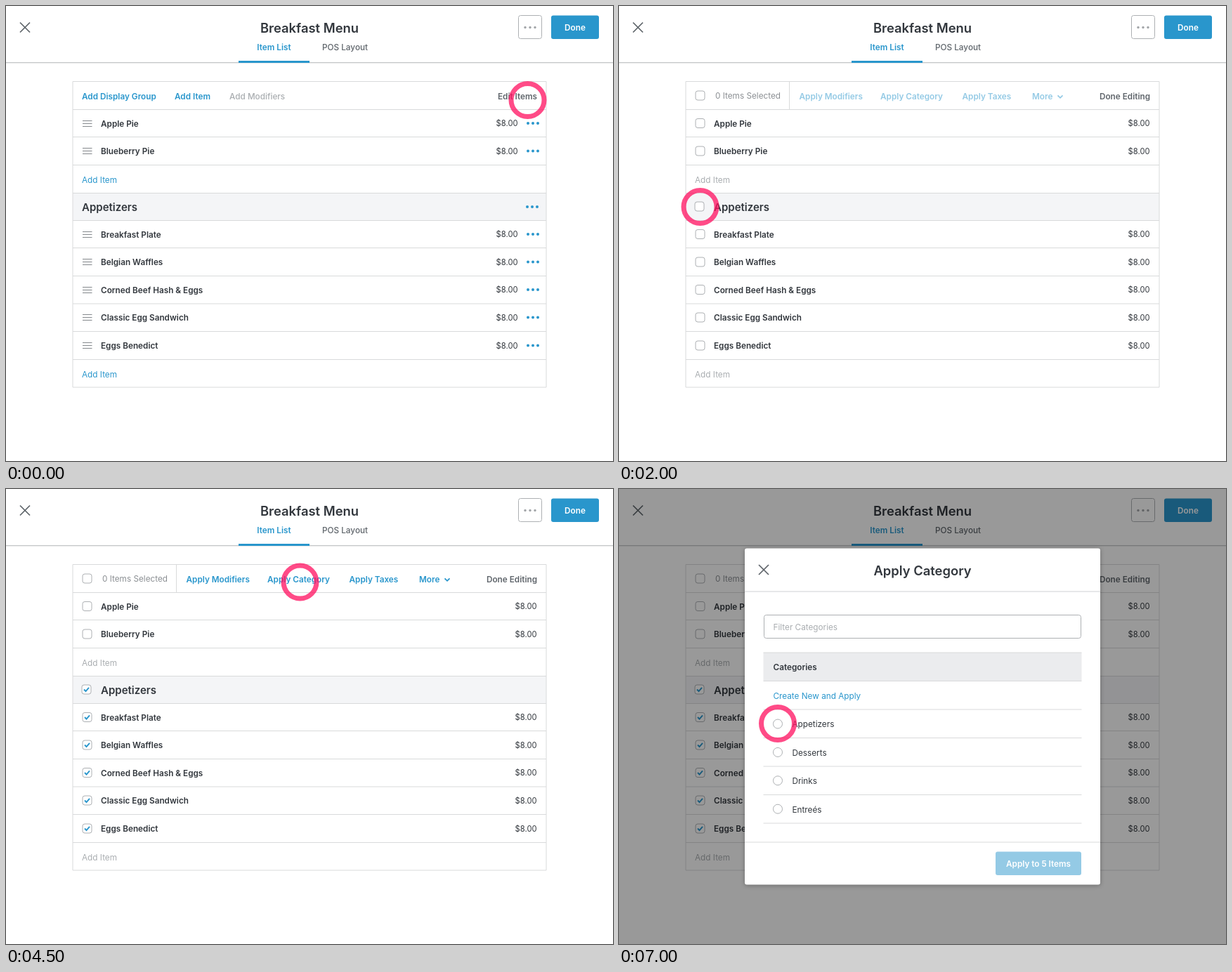
Recreate the animation shown at these times as an HTML page with a canvas. Size 864x648 px, loop 8000 ms.

```html
<!DOCTYPE html>
<html lang="en">
<head>
<meta charset="utf-8">
<title>Breakfast Menu</title>
<style>
html, body { margin: 0; width: 100%; height: 100%; overflow: hidden; background: #fff; }
canvas { display: block; }
</style>
</head>
<body>
<canvas id="stage" width="864" height="648"></canvas>
<script>
const ctx = document.getElementById('stage').getContext('2d');
const BLUE = '#2996cc', PALE = '#94cae5', DARK = '#32373d', GRAY = '#5f656b',
      MUTED = '#a9adb0', LINE = '#d9dadb', BORDER = '#adb0b3';

const ROWS = [
  ['Apple Pie', 167], ['Blueberry Pie', 206.5],
  ['Breakfast Plate', 325], ['Belgian Waffles', 364.5], ['Corned Beef Hash & Eggs', 404],
  ['Classic Egg Sandwich', 443.5], ['Eggs Benedict', 483.5]
];
const RULES = [147.5, 186.5, 226.5, 266.5, 305.5, 344.5, 384.5, 424, 463.5, 503.5];
const LOOP = 8000, STEPS = [500, 3000, 5500];
const RINGS = [[742.5, 134], [115.5, 286], [418.5, 132.5], [226, 334]];

// y is the middle of the capital letters
function text(str, x, y, color, { size = 11.75, weight = 600, align = 'left' } = {}) {
  ctx.font = `${weight} ${size}px Inter, sans-serif`;
  ctx.textAlign = align;
  ctx.fillStyle = color;
  ctx.fillText(str, x, y + size * 0.365);
}

function path(color, width, ...points) {
  ctx.beginPath();
  points.forEach(([x, y]) => ctx.lineTo(x, y));
  ctx.strokeStyle = color;
  ctx.lineWidth = width;
  ctx.stroke();
}

const rule = (x1, x2, y, color = LINE) => path(color, 1, [x1, y], [x2, y]);

function box(x, y, w, h, radius, fill, stroke) {
  ctx.beginPath();
  ctx.roundRect(x, y, w, h, radius);
  if (fill) { ctx.fillStyle = fill; ctx.fill(); }
  if (stroke) { ctx.strokeStyle = stroke; ctx.lineWidth = 1; ctx.stroke(); }
}

function circle(x, y, r, color, width) {
  ctx.beginPath();
  ctx.arc(x, y, r, 0, 2 * Math.PI);
  ctx.fillStyle = ctx.strokeStyle = color;
  ctx.lineWidth = width;
  width ? ctx.stroke() : ctx.fill();
}

function dots(x, y, color, r) {
  for (const dx of [-7, 0, 7]) circle(x + dx, y, r, color);
}

function cross(x, y) {
  path(GRAY, 1.7, [x - 7, y - 7], [x + 7, y + 7]);
  path(GRAY, 1.7, [x - 7, y + 7], [x + 7, y - 7]);
}

function checkbox(x, y, checked) {
  box(x - 6.5, y - 6.5, 13, 13, 3, '#fff', BORDER);
  if (checked) path(BLUE, 1.9, [x - 3.5, y], [x - 1, y + 2.5], [x + 3.5, y - 2.7]);
}

function drawHeader() {
  ctx.fillStyle = '#c4c6c8';
  ctx.fillRect(0, 80, 864, 1);
  ctx.fillStyle = '#ececed';
  ctx.fillRect(0, 81, 864, 1);
  cross(27, 30.5);
  text('Breakfast Menu', 432, 31.5, DARK, { size: 18.4, align: 'center' });
  text('Item List', 381.5, 58.5, BLUE, { align: 'center' });
  text('POS Layout', 482.5, 58.5, GRAY, { weight: 500, align: 'center' });
  ctx.fillStyle = BLUE;
  ctx.fillRect(331, 78, 101, 3);
  box(729.5, 13.5, 33, 33, 3, '#fff', BORDER);
  dots(746, 30.5, '#a3a6a9', 1.7);
  box(776, 13.5, 68, 33.5, 3, BLUE);
  text('Done', 810, 31, '#fff', { align: 'center' });
}

function drawToolbar(editing, active) {
  if (!editing) {
    text('Add Display Group', 108, 128.5, BLUE);
    text('Add Item', 240, 128.5, BLUE);
    text('Add Modifiers', 318, 128.5, MUTED, { weight: 500 });
    text('Edit Items', 756, 128.5, GRAY, { align: 'right' });
    return;
  }
  const color = active ? BLUE : PALE;
  checkbox(115.5, 127.5);
  text('0 Items Selected', 137, 127.5, '#8b8f93', { weight: 400 });
  path(LINE, 1, [242.5, 108], [242.5, 147]);
  text('Apply Modifiers', 256.5, 128.5, color);
  text('Apply Category', 372, 128.5, color);
  text('Apply Taxes', 488.5, 128.5, color);
  text('More', 588, 128.5, color);
  path(color, 1.8, [624.5, 127.3], [628, 130.8], [631.5, 127.3]);
  text('Done Editing', 756, 128.5, GRAY, { align: 'right' });
}

function drawTable(editing, selected) {
  ctx.fillStyle = '#f4f5f7';
  ctx.fillRect(95, 266, 674, 39);
  RULES.forEach(y => rule(95, 769, y));
  box(95, 107.5, 674, 435.5, 0, null, LINE);
  drawToolbar(editing, selected);

  ROWS.forEach(([name, y], i) => {
    if (editing) checkbox(115.5, y, selected && i > 1);
    else {
      for (const dy of [-3.5, 0.5, 4.5]) rule(109, 122.5, Math.floor(y) + dy, '#85898d');
      dots(750, y, BLUE, 2);
    }
    text(name, 135, y + 0.3, DARK);
    text('$8.00', editing ? 755.5 : 728.5, y + 0.3, DARK, { size: 11.2, weight: 400, align: 'right' });
  });

  for (const y of [247.5, 524.5])
    text('Add Item', 108, y, editing ? MUTED : BLUE, { weight: 400 });
  if (editing) checkbox(114.5, 285.5, selected);
  else dots(749, 286, BLUE, 2);
  text('Appetizers', editing ? 135 : 108, 286.5, DARK, { size: 15 });
}

function drawDialog() {
  ctx.fillStyle = 'rgba(0, 0, 0, 0.4)';
  ctx.fillRect(0, 0, 864, 648);
  ctx.save();
  ctx.shadowColor = 'rgba(0, 0, 0, 0.3)';
  ctx.shadowBlur = 6;
  ctx.shadowOffsetY = 1;
  box(179, 84.5, 506, 479, 3, '#fff');
  ctx.restore();

  cross(206, 115);
  text('Apply Category', 432, 116, DARK, { size: 18.4, align: 'center' });
  rule(179, 685, 146, '#cfd1d3');
  box(206.5, 179.5, 451, 33, 3, '#fff', BORDER);
  text('Filter Categories', 219.5, 196.5, MUTED, { weight: 400 });

  ctx.fillStyle = '#ebecee';
  ctx.fillRect(205.5, 233, 453, 40);
  rule(205.5, 658.5, 233, LINE);
  text('Categories', 219.5, 254, DARK);
  text('Create New and Apply', 219.5, 294.5, BLUE, { weight: 400 });
  for (let i = 0; i < 6; i++) rule(205.5, 658.5, 273.5 + i * 40.5);
  ['Appetizers', 'Desserts', 'Drinks', 'Entreés'].forEach((name, i) => {
    const y = 334.5 + i * 40.4;
    circle(226, y, 6.5, BORDER, 1);
    text(name, 246.5, y + 0.7, DARK, { weight: 400 });
  });

  rule(179, 685, 503, LINE);
  box(536, 516.5, 122, 33.5, 3, PALE);
  text('Apply to 5 Items', 597, 534, '#fff', { align: 'center' });
}

function draw() {
  const time = performance.now() % LOOP;
  const step = STEPS.filter(start => time >= start).length;
  ctx.fillStyle = '#fff';
  ctx.fillRect(0, 0, 864, 648);
  drawHeader();
  drawTable(step > 0, step > 1);
  if (step === 3) drawDialog();
  circle(...RINGS[step], 23.5, 'rgba(255, 15, 95, 0.75)', 7);
  requestAnimationFrame(draw);
}
draw();
</script>
</body>
</html>
```
